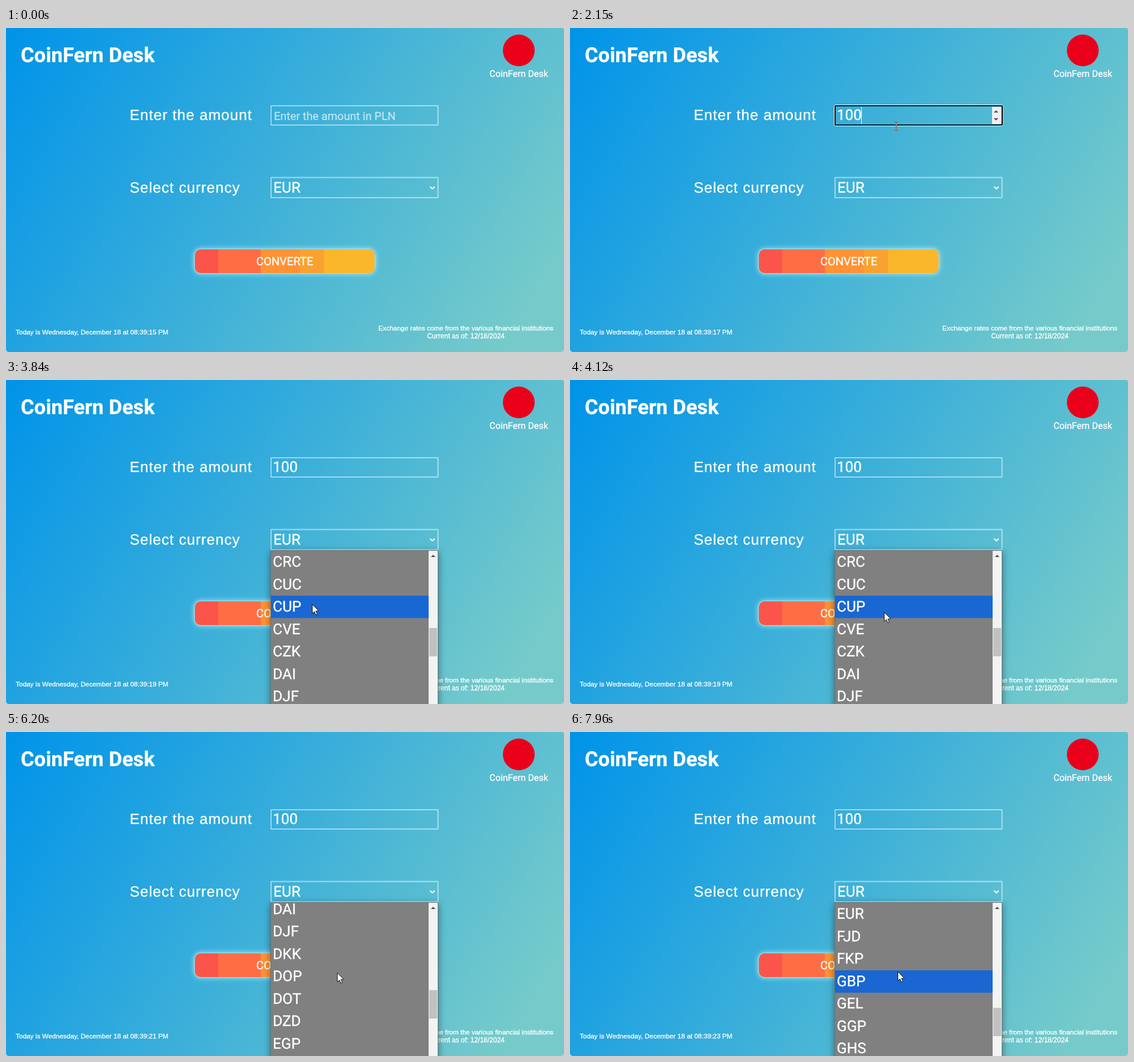
Animation of 981 by 571 pixels, one loop 8000 ms. Source, as an HTML page with a canvas:

```html
<!DOCTYPE html>
<html lang="en">
<head>
<meta charset="utf-8">
<title>Currency calculator</title>
<style>
  html, body { margin: 0; width: 100%; height: 100%; overflow: hidden; }
  canvas { display: block; width: 981px; height: 571px; }
</style>
</head>
<body>
<canvas id="stage" width="981" height="571"></canvas>
<script>
const ctx = document.getElementById('stage').getContext('2d');
const W = 981, H = 571, LOOP = 8000, STEP = 67.4;
const BRAND = 'CoinFern Desk';
const ROBOTO = 'Roboto, sans-serif';
const ARIAL = '"Liberation Sans", Arial, sans-serif';
const EDGE = 'rgba(255,255,255,.52)';
const CODES = ('CRC CUC CUP CVE CZK DAI DJF DKK DOP DOT DZD EGP ERN ETB ' +
  'EUR FJD FKP GBP GEL GGP GHS GIP').split(' ');
const ROW = 39.5, LIST_TOP = 301;
const NOTCH = 14 * ROW / 3;

// Pointer path: time, x, y
const PATH = [
  [200, 877, 565], [470, 752, 425], [605, 622, 276], [740, 584, 194], [810, 573, 173],
  [2440, 573, 173], [2740, 578, 171], [2900, 578, 171], [3230, 584, 275],
  [3460, 584, 277], [3700, 548, 366], [3840, 538, 395], [4200, 556, 413],
  [4540, 583, 424], [4660, 583, 424], [4800, 584, 425], [6133, 584, 425],
  [6200, 582, 424], [7600, 582, 424], [7690, 580, 421], [7830, 580, 421], [7950, 576, 422]
];
const SCROLLS = [[5000, 300], [6143, 270], [6945, 200]];   // start, duration
const KEYS = [1800, 1940, 2140];
const FOCUS = 975, OPEN = 3430;

const clamp = v => Math.min(1, Math.max(0, v));
const smooth = v => { v = clamp(v); return v * v * (3 - 2 * v); };

function pointerAt(t) {
  const i = PATH.findIndex(p => p[0] > t);
  if (i < 0) return PATH[PATH.length - 1].slice(1);
  if (i === 0) return null;
  const [t0, x0, y0] = PATH[i - 1], [t1, x1, y1] = PATH[i];
  const k = (t - t0) / (t1 - t0);
  return [Math.round(x0 + (x1 - x0) * k), Math.round(y0 + (y1 - y0) * k)];
}

const scrollAt = t => SCROLLS.reduce((sum, [start, dur]) => sum + NOTCH * smooth((t - start) / dur), 0);

// A hairline stroke gives the letters their slightly heavier weight.
function text(str, x, y, font, { align = 'left', color = '#fff', spacing = 0, rendering = 'geometricPrecision' } = {}) {
  ctx.font = font;
  ctx.textAlign = align;
  ctx.textRendering = rendering;
  ctx.letterSpacing = spacing + 'px';
  ctx.fillStyle = ctx.strokeStyle = color;
  ctx.lineWidth = 0.35;
  ctx.lineJoin = 'round';
  ctx.fillText(str, x, y);
  ctx.strokeText(str, x, y);
}

function box(x, y, w, h, color) {
  ctx.fillStyle = color;
  ctx.fillRect(x, y, w, h);
}

function shape(points, color) {
  ctx.beginPath();
  points.forEach(([x, y]) => ctx.lineTo(x, y));
  ctx.closePath();
  ctx.fillStyle = color;
  ctx.fill();
}

// dir: -1 points up, 1 points down
function triangle(x, y, dir) {
  shape([[x - 4, y - 2 * dir], [x + 4, y - 2 * dir], [x, y + 2 * dir]], '#505050');
}

function outline(x, y, w, h, r, color, width) {
  ctx.beginPath();
  ctx.roundRect(x, y, w, h, r);
  ctx.strokeStyle = color;
  ctx.lineWidth = width;
  ctx.stroke();
}

function drawBackground() {
  const dx = Math.sin(Math.PI * 2 / 3), dy = 0.5;
  const half = (W * dx + H * dy) / 2;
  const g = ctx.createLinearGradient(W / 2 - dx * half, H / 2 - dy * half, W / 2 + dx * half, H / 2 + dy * half);
  g.addColorStop(0, '#0093e9');
  g.addColorStop(0.92, '#76cbca');
  box(0, 0, W, H, '#b9dcea');
  ctx.beginPath();
  ctx.roundRect(0, 0, W, H, [0, 4, 5, 5]);
  ctx.fillStyle = g;
  ctx.fill();
}

function drawHeader() {
  text(BRAND, 26, 60, '700 36px ' + ROBOTO);
  ctx.beginPath();
  ctx.arc(901.5, 39.5, 28, 0, Math.PI * 2);
  ctx.fillStyle = '#eb001b';
  ctx.fill();
  text(BRAND, 901.5, 86, '16px ' + ROBOTO, { align: 'center' });
}

function drawFooter(t) {
  const sec = 15 + Math.floor((t + 480) / 1000);
  const font = '11.8px ' + ARIAL;
  const centered = { align: 'center', rendering: 'auto' };
  text(`Today is Wednesday, December 18 at 08:39:${sec} PM`, 17, 540, font, { rendering: 'auto' });
  text('Exchange rates come from the various financial institutions', 808.5, 533, font, centered);
  text('Current as of: 12/18/2024', 808.5, 547, '12px ' + ARIAL, centered);
}

function drawInput(t, hovered) {
  const focused = t >= FOCUS && t < OPEN;
  const typed = '100'.slice(0, KEYS.filter(k => t >= k).length);
  text('Enter the amount', 217.5, 162, '26px ' + ARIAL, { spacing: 1 });
  if (focused) {
    outline(464.5, 135.5, 296.5, 37, 3, '#fff', 1);
    outline(466, 137, 294, 34, 2, '#101010', 2);
  } else {
    outline(466, 137, 293.5, 34, 0, EDGE, 2);
  }
  if (typed) text(typed, 469, 162, '26px ' + ROBOTO);
  else text('Enter the amount in PLN', 471, 162, '19.8px ' + ROBOTO, { color: 'rgba(255,255,255,.62)' });

  if (focused || hovered) {
    box(742, 139, 16, 30, '#f0f0f0');
    triangle(749, 147, -1);
    triangle(749, 161, 1);
  }
  const lastKey = Math.max(FOCUS, ...KEYS.filter(k => t >= k));
  if (focused && Math.floor((t - lastKey) / 500) % 2 === 0) {
    box(Math.round(468.6 + typed.length * 14.55), 139, 1, 30, '#fff');
  }
}

function drawSelect() {
  text('Select currency', 217.5, 290, '26px ' + ARIAL, { spacing: 1 });
  outline(466, 263.5, 293.5, 35.5, 0, EDGE, 2);
  text('EUR', 470, 290, '26px ' + ROBOTO);
  ctx.beginPath();
  ctx.moveTo(745.5, 279.5);
  ctx.lineTo(749.5, 283.5);
  ctx.lineTo(753.5, 279.5);
  ctx.strokeStyle = '#fff';
  ctx.lineWidth = 1.8;
  ctx.stroke();
}

function drawButton() {
  ctx.save();
  ctx.shadowColor = '#b4f0fa';
  ctx.shadowBlur = 10;
  ctx.beginPath();
  ctx.roundRect(331.2, 389.2, 317.6, 43.6, 11);
  ctx.fillStyle = '#a6e2f0';
  ctx.fill();
  ctx.shadowColor = 'transparent';
  ctx.beginPath();
  ctx.roundRect(332, 390, 316, 42, 10);
  ctx.clip();
  const bands = [[332, '#fb554b'], [373, '#ff6d45'], [448, '#ff9335'], [517, '#faa231'], [559, '#fbb72b']];
  bands.forEach(([x, color]) => box(x, 390, 648 - x, 42, color));
  ctx.restore();
  text('CONVERTE', 490, 417.5, '20px ' + ROBOTO, { align: 'center' });
}

function drawList(t, pointer) {
  const scroll = scrollAt(t);
  let active = -1;
  if (t > 7620) active = 17;
  else if (t > 5000) active = 3;
  else if (pointer[1] >= LIST_TOP) active = Math.floor((pointer[1] - LIST_TOP) / ROW);

  ctx.save();
  ctx.shadowColor = 'rgba(0,0,0,.45)';
  ctx.shadowBlur = 12;
  ctx.shadowOffsetY = 3;
  box(465, 300, 295, 300, '#707070');
  ctx.restore();

  ctx.save();
  ctx.beginPath();
  ctx.rect(466, LIST_TOP, 293, H - LIST_TOP);
  ctx.clip();
  box(466, LIST_TOP, 277, H, '#808080');
  CODES.forEach((code, i) => {
    const y = LIST_TOP + i * ROW - scroll;
    if (y < LIST_TOP - ROW || y > H) return;
    if (i === active) box(466, Math.round(y), 277, ROW, '#1967d2');
    text(code, 469, Math.round(y + 28.3), '26px ' + ROBOTO);
  });
  box(743, LIST_TOP, 16, H, '#f3f3f3');
  triangle(751, 310, -1);
  box(744, Math.round(437 + scroll * 49 / 553), 14, 50, '#c1c1c1');
  ctx.restore();
}

function drawArrow(x, y) {
  const tip = [[0, 0], [0, 16], [3.7, 12.6], [6.2, 18.3], [8.8, 17.2], [6.3, 11.6], [11.3, 11.4]];
  shape(tip.map(([a, b]) => [x + a + 0.5, y + b + 0.5]), '#fff');
  ctx.strokeStyle = '#111';
  ctx.lineWidth = 1;
  ctx.stroke();
}

function drawBeam(x, y) {
  ctx.save();
  ctx.globalCompositeOperation = 'difference';
  box(x, y - 7, 1, 14, '#fff');
  for (const end of [y - 8, y + 7]) {
    box(x - 3, end, 3, 1, '#fff');
    box(x + 1, end, 3, 1, '#fff');
  }
  ctx.restore();
}

function draw(now) {
  const t = Math.floor((now % LOOP + 20) / STEP) * STEP;
  const pointer = pointerAt(t);
  const inInput = pointer !== null && pointer[1] >= 136 && pointer[1] <= 174;
  drawBackground();
  drawHeader();
  drawInput(t, inInput);
  drawSelect();
  drawButton();
  drawFooter(t);
  if (t >= OPEN) drawList(t, pointer);
  if (pointer) (inInput ? drawBeam : drawArrow)(...pointer);
  requestAnimationFrame(draw);
}
requestAnimationFrame(draw);
</script>
</body>
</html>
```
